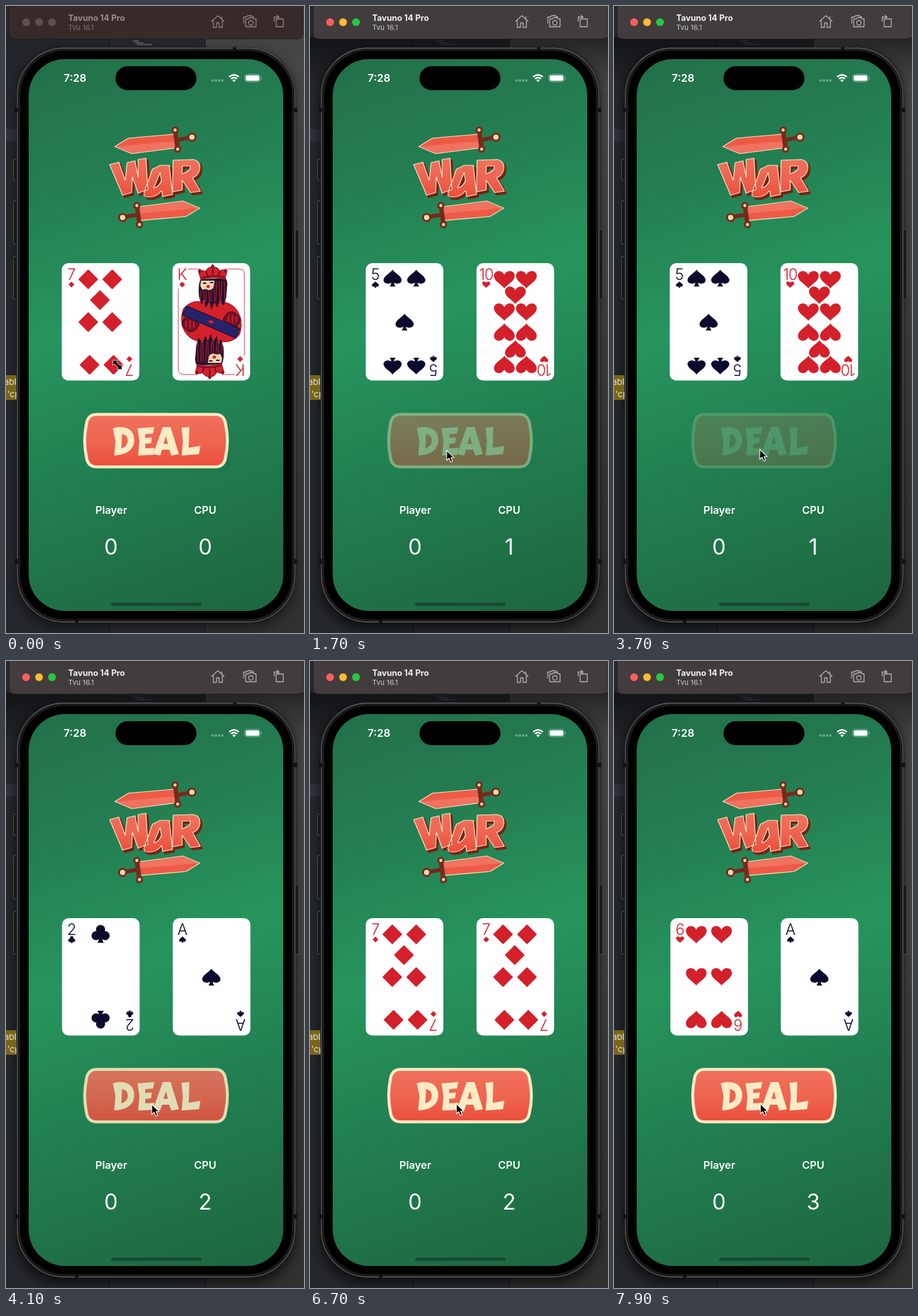
Write an HTML page that moves like this. It is 460 px wide and 968 px high and loops after 8000 ms.

```html
<!DOCTYPE html>
<html lang="en">
<head>
<meta charset="utf-8">
<title>War card game</title>
<style>
html, body { margin: 0; width: 100%; height: 100%; overflow: hidden; background: #222427; }
svg { display: block; width: 460px; height: 968px; }
text { font-family: Inter, Roboto, sans-serif; }
.mid { text-anchor: middle; }
</style>
</head>
<body>
<svg viewBox="0 0 460 968">
  <defs>
    <linearGradient id="felt" gradientUnits="userSpaceOnUse" x1="87" y1="56" x2="397" y2="940">
      <stop offset="0" stop-color="#226f4a"/><stop offset=".2" stop-color="#247c51"/>
      <stop offset=".45" stop-color="#26945d"/><stop offset=".72" stop-color="#217c4f"/>
      <stop offset="1" stop-color="#1d6640"/>
    </linearGradient>
    <linearGradient id="red" x2="0" y2="1">
      <stop offset="0" stop-color="#f0725d"/><stop offset=".55" stop-color="#ee6350"/><stop offset="1" stop-color="#ec4e3d"/>
    </linearGradient>
    <linearGradient id="side" x2="0" y2="1">
      <stop offset="0" stop-color="#4b4b4b"/><stop offset=".5" stop-color="#434343"/><stop offset="1" stop-color="#303030"/>
    </linearGradient>
    <linearGradient id="fade" x2="0" y2="1">
      <stop offset="0" stop-color="#000" stop-opacity=".5"/><stop offset="1" stop-color="#000" stop-opacity="0"/>
    </linearGradient>
    <filter id="blur" x="-20%" y="-20%" width="140%" height="140%"><feGaussianBlur stdDeviation="9"/></filter>
    <g id="sword">
      <path d="M168 217L189 204L259 198L262 219L194 228Z" fill="#ee5a48" stroke="#fdebc4" stroke-width="1.200"/>
      <path d="M170 217L260 209L261 218L194 227Z" fill="#f0735f"/>
      <g stroke="#762a1c" fill="none" stroke-linecap="round">
        <path d="M261 192L265 221" stroke-width="7"/><path d="M263 207L286 203" stroke-width="6"/>
      </g>
      <g fill="#762a1c"><circle cx="261" cy="191.500" r="5.500"/><circle cx="265" cy="221" r="5.500"/><circle cx="287" cy="202.500" r="7"/></g>
      <g fill="#fbd9ad"><circle cx="261" cy="191.500" r="2.400"/><circle cx="265" cy="221" r="2.400"/><circle cx="287" cy="202.500" r="4"/></g>
    </g>
    <path id="war" fill-rule="evenodd" d="M160 245L174 241L184 269L187 242L199 239L204 264L204 237L216 235L219 283L204 289L195 264L194 288L180 292Z
      M214 286L226 252L238 246L252 246L257 291L242 294L240 285Q233 295 221 295Q210 295 214 286ZM238 257L228 281Q236 279 240 270Z
      M258 238L289 237Q301 239 299 252Q297 262 288 265L300 286L285 288L272 269L272 284L257 287ZM272 247L284 247Q287 254 272 259Z"/>
    <path id="diamond" d="M0-14L14 0L0 14L-14 0Z" stroke-width="2" stroke-linejoin="round" stroke="#d4202b"/>
    <path id="heart" d="M0 14C-4 8-16 3-16-5C-16-15-3-15 0-7C3-15 16-15 16-5C16 3 4 8 0 14Z"/>
    <path id="spade" d="M0-13C3-8 14-3 14 3C14 9 6 10 2 7Q2 10 4.500 13H-4.500Q-2 10-2 7C-6 10-14 9-14 3C-14-3-3-8 0-13Z"/>
    <g id="club"><circle cy="-6.500" r="7"/><circle cx="-7" cy="3" r="7"/><circle cx="7" cy="3" r="7"/><path d="M-2 0H2Q2 11 5 14H-5Q-2 11-2 0Z"/></g>
    <g id="king">
      <path d="M43 25Q39 36 41 52L45 64L49 56L51 69L57 59L60 72L65 60L69 69L73 57L79 66L83 53L84 38Q86 30 82 23Z" fill="#24102f"/>
      <path id="beard" fill="none" stroke="#a51c2b" stroke-width="1.400"/>
      <path d="M44 27H65L63 38Q58 44 52 40L46 41L43 35Z" fill="#f6d6ae"/>
      <path d="M47 31H52M58 30H63" stroke="#14102f" stroke-width="1.800"/>
      <circle cx="55" cy="36" r="2.500" fill="#d4202b"/>
      <path d="M44 26L40 13Q45 9 51 13Q54 5 62 6Q70 5 73 12Q79 8 84 13L81 25Q62 20 44 26Z" fill="#d4202b" stroke="#7c1426"/>
      <path d="M45 23Q62 17 81 22M52 12L54 20M62 7V18M73 12L71 20" stroke="#4c1026" fill="none" stroke-width="1.500"/>
      <path d="M42 8L45 12L42 16L39 12ZM62 1L65 5L62 9L59 5ZM82 8L85 12L82 16L79 12Z" fill="#8c1526"/>
    </g>
  </defs>

  <rect width="460" height="968" fill="#24272c"/>
  <rect x="160" width="147" height="968" fill="#292b30"/>
  <rect x="307" width="153" height="968" fill="url(#side)"/>
  <path d="M159.500 0V968M307.500 0V968" stroke="#16181b"/>
  <path d="M0 190H16V209H0Z" fill="#30333a"/>
  <path id="code" d="M196 54H205M202 59.500H225M199 57H212" stroke-width="1.500"/>
  <rect id="shadow" x="16" y="70" width="431" height="890" rx="70" filter="url(#blur)"/>
  <rect id="barShadow" y="48" width="460" height="80" fill="url(#fade)"/>
  <rect y="570" width="16" height="38" fill="#79661d"/>
  <g fill="#e6dfc8" font-size="13.500"><text x="-3" y="585">abl</text><text x="2" y="604">'cp</text></g>

  <g fill="#191919" stroke="#505050">
    <rect x="11.500" y="236.500" width="8" height="33" rx="2"/><rect x="11.500" y="300.500" width="8" height="67" rx="2"/>
    <rect x="11.500" y="386.500" width="8" height="66" rx="2"/><rect x="444" y="345.500" width="8" height="107" rx="2"/>
  </g>
  <rect x="16" y="63.500" width="431.500" height="889" rx="73" fill="#141414"/>
  <rect x="17.500" y="65" width="428.500" height="886" rx="72" fill="#1b1b1b" stroke="#5e5e5e" stroke-width="1.300"/>
  <path d="M16 157V164M447 157V164M16 854V861M447 854V861M353 64V70M109 946V952" stroke="#111" stroke-width="5"/>
  <rect x="22" y="69.500" width="419.500" height="877" rx="68"/>
  <rect x="35" y="82" width="393" height="852" rx="56" fill="url(#felt)"/>
  <rect x="169" y="93" width="125" height="37" rx="18.500"/>

  <g fill="#fff">
    <text class="mid" x="106.500" y="117" font-size="16.500" font-weight="600">7:28</text>
    <g opacity=".35"><circle cx="319" cy="115" r="1.900"/><circle cx="324" cy="115" r="1.900"/><circle cx="329" cy="115" r="1.900"/><circle cx="334" cy="115" r="1.900"/></g>
    <path d="M352 117.500L349.300 114.500Q352 112.500 354.700 114.500Z"/>
    <g fill="none" stroke="#fff" stroke-width="2.200"><path d="M344.500 109.500Q352 103 359.500 109.500"/><path d="M347.200 112.500Q352 108.500 356.800 112.500"/></g>
    <rect x="368.500" y="105.500" width="24" height="11.500" rx="3.800" fill="none" stroke="#fff" opacity=".45"/>
    <rect x="370" y="107" width="21" height="8.500" rx="2.500"/><path d="M394 109Q396 111 394 113.500Z" opacity=".5"/>
    <g class="mid" font-size="16.300" font-weight="600"><text x="162.500" y="784">Player</text><text x="307.500" y="784">CPU</text></g>
    <g class="mid" font-size="33.500"><text x="162" y="847">0</text><text id="cpu" x="307.500" y="847">0</text></g>
  </g>
  <rect x="162" y="921" width="140" height="5" rx="2.500" fill="#174b32"/>

  <use href="#sword"/><use href="#sword" transform="rotate(180 233.500 264.500)"/>
  <use href="#war" x="3" y="3.500" fill="#762419" stroke="#762419" stroke-width="2"/>
  <use href="#war" fill="url(#red)" stroke="#fdebc4" stroke-width="1.200" stroke-linejoin="round"/>

  <g id="left"></g><g id="right"></g>

  <g id="deal">
    <path d="M139 630.500H324Q337 631 339 646Q344.500 671 339 696Q337 711 324 711.500H139Q126 711 124 696Q119 671 124 646Q126 631 139 630.500Z" fill="url(#red)" stroke="#fdebc4" stroke-width="4.600"/>
    <path fill="#fdebc4" fill-rule="evenodd" d="M165 652L173 650Q198 649 198 671Q197 692 167 694L169 672ZM179 661L178 683Q188 680 188 671Q188 662 179 661Z
      M203 652L229 650L227 660L215 661V667L225 666L224 675L215 676V683L229 682L228 693L204 694L206 672Z
      M242 650L254 650L267 692L255 694L252 685H241L238 694L227 692ZM247 664L250 676H243Z
      M271 651L283 650L282 682L300 679L298 692L271 694L273 672Z"/>
  </g>

  <path id="bar" d="M5 0H458.500V42Q458.500 51 449.500 51H14Q5 51 5 42Z" stroke="#151515" stroke-opacity=".6"/>
  <g id="lights"><circle cx="31" cy="25" r="6"/><circle cx="51" cy="25" r="6"/><circle cx="71" cy="25" r="6"/></g>
  <g id="title"><text x="96" y="23" font-size="12.800" font-weight="700">Tavuno 14 Pro</text><text x="96" y="37" font-size="11" opacity=".75">Tvu 16.1</text></g>
  <g id="icons" fill="none" stroke-width="1.300" stroke-linejoin="round">
    <path d="M317 24L327 15L337 24M320 22V33H325V26H329V33H334V22M333 20V16"/>
    <path d="M367 27V17H371L373 15H379L381 17H383M371 20H374L376 18H381L383 20H386V32H370V20Z"/><circle cx="378" cy="26" r="3.500"/>
    <path d="M417 20H428V32H417ZM414 24V17H421M418 14L421.500 17L418 20"/>
  </g>

  <path id="resize" d="M-7-7H1L-1.500-4.500L4.500 1.500L7-1V7H-1L1.500 4.500L-4.500-1.500L-7 1Z" stroke="#fff" stroke-width=".8"/>
  <path id="arrow" d="M0 0V15.500L3.600 12.200L6.200 18.200L9 17L6.500 11.200H11.300Z" stroke="#fff" stroke-width="1.100" stroke-linejoin="round"/>
</svg>
<script>
const $ = id => document.getElementById(id);
const LOOP = 8000, RED = '#d4202b', NAVY = '#0a0a2c';

const pip = (suit, x, y, flip, k = 1) =>
  `<use href="#${suit}" transform="translate(${x} ${y}) rotate(${flip ? 180 : 0}) scale(${k})"/>`;
const turned = s => s + `<g transform="rotate(180 59.75 90.5)">${s}</g>`;

// Pips are x, y pairs; those below the middle are upside down.
function card(rank, suit, spots, { dx = 0, art = '' } = {}) {
  const color = suit == 'diamond' || suit == 'heart' ? RED : NAVY;
  let pips = '';
  for (let i = 0; i < spots.length; i += 2)
    pips += pip(suit, spots[i], spots[i + 1], spots[i + 1] > 95);
  const spacing = rank == '10' ? -1 : 0;
  const corner = `<text class="mid" x="15" y="25.500" font-size="23.500" font-weight="350" letter-spacing="${spacing}">${rank}</text>` +
    pip(suit, 15, 33, false, suit == 'diamond' ? .3 : .38);
  return `<g transform="translate(${dx})" fill="${color}"><rect width="119.800" height="181.300" rx="10" fill="#fff"/>${art}${pips}${turned(corner)}</g>`;
}

let hair = '';
for (let i = 0; i < 10; i++) hair += `M${44 + i * 4} ${i < 5 ? 42 : 28}l${i % 2 ? 1 : -1} ${i < 5 ? 18 : 32}`;
$('beard').setAttribute('d', hair);

const royal =
  `<path d="M24 9H40M84 9H102Q111 9 111 18V143M96 172H80M36 172H18Q9 172 9 163V39" fill="none" stroke="${RED}" stroke-width=".9"/>
  <path d="M17 70Q30 56 45 60H78Q98 62 105 84Q108 100 103 111Q92 124 75 121H42Q22 118 15 97Q12 82 17 70Z" fill="${RED}" stroke="#8c1526"/>` +
  turned(`<path d="M15 93Q17 82 28 81Q40 84 41 95Q36 106 27 106Q18 103 15 93Z" fill="#781226" stroke="${NAVY}"/>
    <path d="M21 90V99M27 88V101M33 91V99" stroke="${RED}" stroke-width="2"/>`) +
  `<path d="M15 80L22 66L104 101L98 116Z" fill="#25246a" stroke="${NAVY}"/>
  <path d="M54 90L59 87L65 91L60 94Z" fill="${RED}"/>` + turned('<use href="#king"/>');

const cards = {
  d7: card('7', 'diamond', [41, 25, 78, 25, 59, 57, 41, 91, 78, 91, 43, 157, 80, 157]),
  dK: card('K', 'diamond', [], { art: royal }),
  s5: card('5', 'spade', [41.500, 23, 78, 23, 60, 91, 41.500, 159, 78, 159]),
  h10: card('10', 'heart', [43, 25, 77, 25, 60, 49, 43, 75, 77, 75, 43, 107, 77, 107, 60, 133, 43, 157, 77, 157]),
  c2: card('2', 'club', [59.500, 24, 59.500, 157], { dx: .5 }),
  sA: card('A', 'spade', [59.500, 91], { dx: .5 }),
  h6: card('6', 'heart', [40, 25, 79, 25, 40, 90, 79, 90, 40, 157, 79, 157], { dx: 1 })
};

// Each tap dims the button at `down`; the cards change at `up`.
const deals = [
  { down: -900, up: -800, left: 'd7', right: 'dK', cpu: 0 },
  { down: 1490, up: 1590, left: 's5', right: 'h10', cpu: 1 },
  { down: 3660, up: 3765, left: 'c2', right: 'sA', cpu: 2 },
  { down: 5560, up: 5625, left: 'd7', right: 'd7', cpu: 2 },
  { down: 7160, up: 7260, left: 'h6', right: 'sA', cpu: 3 }
];
// time, x, y
const path = [[0, 172, 554], [100, 172, 554], [650, 211, 686], [1800, 211, 686], [2200, 226, 681],
  [2900, 226, 681], [3500, 225, 684.500], [5900, 225, 684.500], [6500, 226, 683.500], [LOOP, 226, 683.500]];

$('left').setAttribute('transform', 'translate(86 397)');
$('right').setAttribute('transform', 'translate(257 397)');

function cursorAt(t) {
  const i = path.findIndex(p => p[0] > t);
  const [a, b] = [path[i - 1], path[i]];
  const k = (t - a[0]) / (b[0] - a[0]), e = k * k * (3 - 2 * k);
  return [a[1] + (b[1] - a[1]) * e, a[2] + (b[2] - a[2]) * e];
}

function setActive(on) {
  $('bar').setAttribute('fill', on ? '#423c3e' : '#372b2a');
  const colors = on ? ['#fe5f57', '#febc2e', '#28c840'] : Array(3).fill('#5a5150');
  [...$('lights').children].forEach((c, i) => c.setAttribute('fill', colors[i]));
  $('title').setAttribute('fill', on ? '#f6f3f4' : '#988d8c');
  $('icons').setAttribute('stroke', on ? '#b7b1b3' : '#8f8684');
  $('code').setAttribute('stroke', on ? '#4c4860' : '#777a7c');
  $('shadow').setAttribute('opacity', on ? .65 : .45);
  $('barShadow').setAttribute('opacity', on ? 1 : .2);
}

let shown, active;
function render(t) {
  const deal = deals.filter(d => d.up <= t).pop();
  if (deal != shown) {
    shown = deal;
    $('left').innerHTML = cards[deal.left];
    $('right').innerHTML = cards[deal.right];
    $('cpu').textContent = deal.cpu;
  }
  const held = deals.some(d => d.down <= t && t < d.up);
  $('deal').setAttribute('opacity', held ? .2 : Math.min(1, .2 + .8 * (t - deal.up) / 400));

  const on = t >= 700;
  if (on !== active) setActive(active = on);

  const [x, y] = cursorAt(t), resizing = t < 200;
  for (const [id, visible] of [['resize', resizing], ['arrow', !resizing]]) {
    $(id).setAttribute('transform', `translate(${x} ${y})`);
    $(id).setAttribute('visibility', visible ? 'visible' : 'hidden');
  }
}

const start = performance.now();
function tick() {
  render((performance.now() - start) % LOOP);
  requestAnimationFrame(tick);
}
tick();
</script>
</body>
</html>
```
